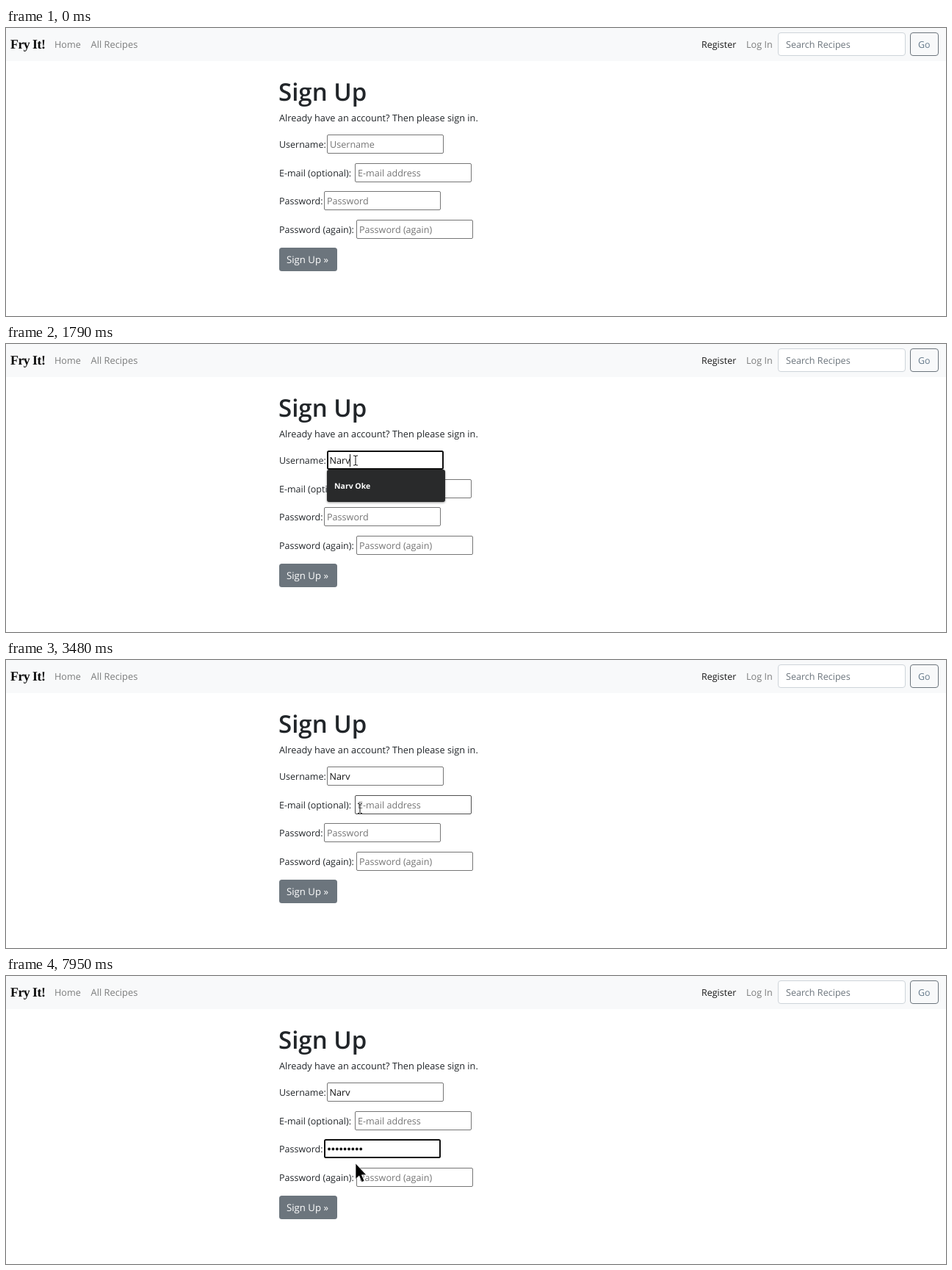
Write an HTML page that moves like this. It is 1280x392 px and loops after 8000 ms.

```html
<!DOCTYPE html>
<html lang="en">
<head>
<meta charset="utf-8">
<title>Sign Up</title>
<style>
  html, body { margin: 0; width: 100%; height: 100%; overflow: hidden; background: #fff; }
  svg { display: block; width: 100%; height: 100%; }
  text { font-family: "Open Sans", "Noto Sans", sans-serif; text-rendering: geometricPrecision; white-space: pre; }
  .brand { font-family: "Liberation Serif", "Noto Serif", serif; font-weight: 700; letter-spacing: -0.6px; }
</style>
</head>
<body>
<svg id="stage" viewBox="0 0 1280 392"></svg>
<script>
const LOOP = 8000;
const INK = '#212529', HINT = '#757575', GREY = '#6c757d';
const USER = 'Narv', FULL_NAME = 'Narv Oke';
const FIELD_W = 159, FIELD_H = 26;
const stage = document.getElementById('stage');

function set(el, attrs) {
  for (const name in attrs) el.setAttribute(name, attrs[name]);
  return el;
}

function add(tag, attrs, parent = stage) {
  const el = document.createElementNS('http://www.w3.org/2000/svg', tag);
  parent.appendChild(el);
  return set(el, attrs);
}

function label(str, x, y, fill = INK, size = 12.6, extra = {}, parent = stage) {
  const el = add('text', { x, y, fill, 'font-size': size, ...extra }, parent);
  el.textContent = str;
  return el;
}

function box(x, y, width, height, attrs, parent = stage) {
  return add('rect', { x, y, width, height, ...attrs }, parent);
}

const show = (el, on) => el.setAttribute('visibility', on ? 'visible' : 'hidden');

// Navigation bar
box(0, 0, 1280, 45, { fill: '#f8f9fa' });
label('Fry It!', 6, 28, '#0c0c0c', 18, { class: 'brand' });
label('Home', 66, 27, '#7c7d7d', 12.7);
label('All Recipes', 115.5, 27, '#7c7d7d', 12.9);
label('Register', 947, 27, '#191919', 12.5);
label('Log In', 1008, 27, '#7c7d7d', 12.7);
box(1051.5, 6.5, 173, 31, { rx: 3.5, fill: '#fff', stroke: '#ced4da' });
label('Search Recipes', 1062, 27, GREY);
box(1231.5, 6.5, 38, 31, { rx: 3.5, fill: 'none', stroke: GREY });
label('Go', 1242, 27, '#64798a', 12.4);

// Form
label('Sign Up', 371, 99, INK, 33, { 'font-weight': 600 });
label('Already have an account? Then please sign in.', 372, 127, INK, 12.75);

function field(caption, hint, x, y) {
  label(caption, 372, y + 17.5, INK, 12.5);
  const frame = add('rect', { rx: 1.5, fill: '#fff' });
  return { x, y, frame, hint: label(hint, x + 4, y + 17.5, HINT) };
}
const user = field('Username:', 'Username', 437, 145);
const email = field('E-mail (optional):', 'E-mail address', 475, 184);
const pass = field('Password:', 'Password', 433, 222);
const again = field('Password (again):', 'Password (again)', 477, 261);
const fields = [user, email, pass, again];

// The border is drawn inside the field's edge.
function drawBorder({ x, y, frame }, stroke, width) {
  set(frame, {
    x: x + width / 2, y: y + width / 2,
    width: FIELD_W - width, height: FIELD_H - width,
    stroke, 'stroke-width': width
  });
}

box(372, 299, 79, 32, { rx: 3.5, fill: GREY });
label('Sign Up »', 382, 320, '#fff', 13.2);

const typed = label(USER, 440.5, 162.5, '#111');
const dots = Array.from({ length: 9 }, (_, i) =>
  add('circle', { cx: 440 + 5.4 * i, cy: 235.5, r: 1.9, fill: '#111' }));
const caret = box(0, 0, 1, 17, { fill: '#111' });

// Suggestion list and tooltip
const list = add('g', { style: 'filter: drop-shadow(0 1px 1.5px rgba(0,0,0,.4))' });
box(437, 171, 161, 44, { rx: 3, fill: '#292a2b' }, list);
label(FULL_NAME, 447, 197, '#fff', 10.5, { 'font-weight': 700 }, list);

const tip = add('g', {});
box(483.5, 170.5, 107, 19, { fill: '#2b2b2b', stroke: '#222' }, tip);
label('Please fill in this field.', 489, 184, '#f4f4f4', 9.5, {}, tip);

// Pointers
const arrow = add('path', {
  d: 'M0 0V21.5L4.8 17L8.4 25.5L12 24L8.4 15.8H14.8Z',
  fill: '#000', stroke: '#fff', 'stroke-width': 0.7
});
const beam = add('path', {
  d: 'M-3 -6.5H-1L0 -5.5L1 -6.5H3M0 -5.5V5.5M-3 6.5H-1L0 5.5L1 6.5H3',
  fill: 'none', stroke: '#111'
});

// Each move advances in even steps along its points.
const moves = [
  { from: 260, to: 860, steps: 9, pts: [[505, 333], [490, 270], [478, 200], [476, 147], [476, 158.5]] },
  { from: 1860, to: 2400, steps: 9, pts: [[474, 168], [450, 225], [410, 279], [376, 270], [360, 256]] },
  { from: 2470, to: 2810, steps: 6, pts: [[368, 240], [373, 222], [373, 202], [346, 190], [420, 192], [484, 197]] },
  { from: 3480, to: 3680, steps: 4, pts: [[482, 202], [479, 212], [476, 224], [475, 232]] },
  { from: 7950, to: 7950, steps: 1, pts: [[476, 255]] }
];

function pointerAt(t) {
  const move = moves.filter(m => t >= m.from).pop();
  if (!move) return null;
  const { from, to, steps, pts } = move;
  if (steps === 1) return pts[0];
  const step = Math.min(steps - 1, Math.floor((t - from) / (to - from) * (steps - 1) + 0.1));
  const u = step / (steps - 1) * (pts.length - 1);
  const i = Math.min(pts.length - 2, Math.floor(u));
  return pts[i].map((v, axis) => v + (pts[i + 1][axis] - v) * (u - i));
}

const FOCUS_USER = 1660, BLUR_USER = 2530, FOCUS_PASS = 3880;
const keys = [4890, 5150, 5350, 6010, 6160, 6360, 7220, 7320, 7420];
const caretOn = [FOCUS_USER, FOCUS_PASS, ...keys];
const caretOff = [2190, 4420, 5880, 6890, 7880];
const latest = (times, t) => Math.max(-1, ...times.filter(v => v <= t));

function render(t) {
  const inUser = t >= FOCUS_USER && t < BLUR_USER;
  const inPass = t >= FOCUS_PASS;
  const count = keys.filter(k => k <= t).length;
  const pos = pointerAt(t);

  const over = pos && fields.find(f =>
    pos[0] >= f.x && pos[0] <= f.x + FIELD_W && pos[1] >= f.y && pos[1] <= f.y + FIELD_H &&
    !(f === email && inUser));
  const active = inUser ? user : inPass ? pass : null;
  for (const f of fields) {
    if (f === active) drawBorder(f, '#101010', 2);
    else drawBorder(f, f === over ? '#4f4f4f' : '#767676', 1);
  }

  show(user.hint, t < FOCUS_USER);
  show(typed, t >= FOCUS_USER);
  show(pass.hint, count === 0);
  dots.forEach((dot, i) => show(dot, i < count));

  show(caret, active && latest(caretOn, t) > latest(caretOff, t));
  set(caret, { x: inUser ? 468 : Math.round(437 + 5.4 * count), y: inUser ? 150 : 226 });

  const fade = Math.min(1, Math.max(0, (t - BLUR_USER) / 114));
  const scale = 1 - 0.055 * fade;
  show(list, t >= FOCUS_USER && fade < 1);
  set(list, {
    opacity: 1 - fade,
    transform: `translate(517.5 193) scale(${scale}) translate(-517.5 -193)`
  });
  show(tip, t >= 1390 && t < FOCUS_USER);

  show(arrow, pos && !over);
  show(beam, pos && over);
  if (pos) set(over ? beam : arrow, { transform: `translate(${pos[0]} ${pos[1]})` });
}

const start = performance.now();
function tick() {
  render((performance.now() - start) % LOOP);
  requestAnimationFrame(tick);
}
render(0);
requestAnimationFrame(tick);
</script>
</body>
</html>
```
